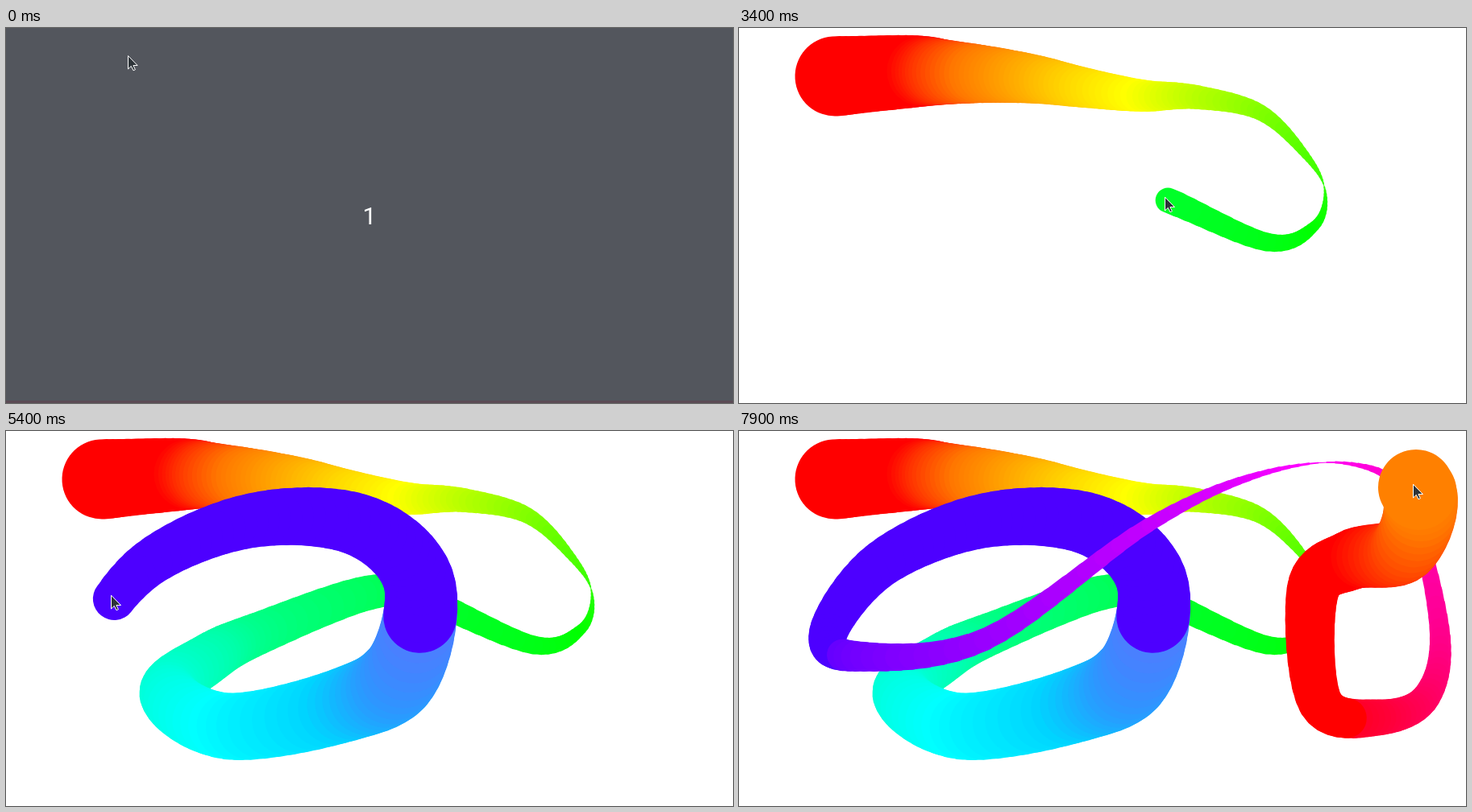
An HTML page with a canvas that plays this animation: 902x466 px, repeating every 8000 ms.

```html
<!DOCTYPE html>
<html lang="en">
<head>
<meta charset="utf-8">
<title>Rainbow brush</title>
<style>
html, body { margin: 0; width: 100%; height: 100%; overflow: hidden; background: #fff; }
canvas { display: block; }
</style>
</head>
<body>
<canvas id="stage" width="902" height="466"></canvas>
<script>
const ctx = document.getElementById('stage').getContext('2d');
const LOOP = 8000, FRAME = 100, SPACING = 10;

// Key points of the brush path, one every SPACING brush steps
const path = [
  [119, 60], [215, 54], [259, 55], [313, 58], [370, 64], [428, 74], [500, 84], [568, 86],
  [647, 105], [703, 158], [727, 202], [714, 246], [655, 266], [521, 210], [450, 201],
  [312, 252], [251, 283], [202, 327], [278, 367], [420, 340], [493, 296], [512, 186],
  [438, 117], [306, 111], [178, 164], [111, 250], [145, 280], [305, 259], [508, 117],
  [645, 54], [760, 41], [828, 86], [869, 245], [853, 330], [793, 356], [721, 337],
  [712, 198], [760, 160], [826, 145], [840, 70], [740, 40]
];

// Catmull-Rom curve through the key points
function brushAt(step) {
  const i = Math.floor(step / SPACING), u = step / SPACING - i;
  const b = path[i], c = path[i + 1], a = path[i - 1] || b, d = path[i + 2] || c;
  return [0, 1].map(k => b[k] + u / 2 * (c[k] - a[k]
    + u * (2 * a[k] - 5 * b[k] + 4 * c[k] - d[k]
    + u * (3 * (b[k] - c[k]) + d[k] - a[k]))));
}

// The width bounces between 100 and 1
const widthAt = step => 1 + Math.abs(99 - step % 198);

// One degree of hue per step; reds and violets collapse into flat bands
function colourAt(step) {
  const h = step % 360;
  let hue = h, light = 50;
  if (h < 12 || h > 345) hue = 0;
  else if (h < 28) hue = (h - 12) * 1.75;
  else if (h > 60 && h < 130) hue = h + 10 * Math.sin(Math.PI * (h - 60) / 70);
  else if (h > 258) hue = h + 5;
  else if (h > 206) hue = 258;
  else if (h > 190) {
    hue = 190 + 2 * (h - 190);
    light = 50 + 0.9 * (h - 190);
  }
  return `hsl(${hue}, 100%, ${light}%)`;
}

// The brush speeds up at first, then keeps a steady pace
function stepAt(t) {
  const s = (t - 1000) / 1000;
  return Math.round(s < 0.8 ? 1 + 35 * (s / 0.8) ** 1.33 : 36 + 58.1 * (s - 0.8));
}

function drawTrail(last) {
  ctx.lineCap = 'round';
  for (let step = 1; step <= last; step++) {
    ctx.strokeStyle = colourAt(step);
    ctx.lineWidth = widthAt(step);
    ctx.beginPath();
    ctx.moveTo(...brushAt(step - 1));
    ctx.lineTo(...brushAt(step));
    ctx.stroke();
  }
}

const arrow = new Path2D('M.5 .5V17l3.8-3.6 2.7 5.4 2.4-1.1-2.5-5.2h5.2z');

function drawPointer(x, y) {
  ctx.save();
  ctx.translate(Math.round(x), Math.round(y));
  ctx.fillStyle = '#2d3338';
  ctx.strokeStyle = '#fff';
  ctx.lineWidth = 1;
  ctx.fill(arrow);
  ctx.stroke(arrow);
  ctx.restore();
}

function drawCountdown(alpha) {
  ctx.globalAlpha = alpha;
  ctx.fillStyle = '#53565d';
  ctx.fillRect(0, 0, 902, 466);
  ctx.fillStyle = '#5b4b55';
  ctx.fillRect(0, 463, 902, 3);
  ctx.fillStyle = '#fff';
  ctx.font = '30px Roboto, sans-serif';
  ctx.textAlign = 'center';
  ctx.fillText('1', 451, 244);
  ctx.globalAlpha = 1;
}

function draw(t) {
  ctx.fillStyle = '#fff';
  ctx.fillRect(0, 0, 902, 466);
  if (t < 200) drawCountdown(1 - t / 200);
  if (t < 1000) {
    const p = Math.max(0, Math.min(1, (t - 300) / 200));
    drawPointer(151 - 34 * p, 34 + 23 * p);
  } else {
    const step = stepAt(t), [x, y] = brushAt(step);
    drawTrail(step);
    drawPointer(x - 4, y - 4);
  }
}

const start = performance.now();
let shown = -1;
function tick() {
  const frame = Math.floor((performance.now() - start) % LOOP / FRAME);
  if (frame !== shown) draw((shown = frame) * FRAME);
  requestAnimationFrame(tick);
}
tick();
</script>
</body>
</html>
```
